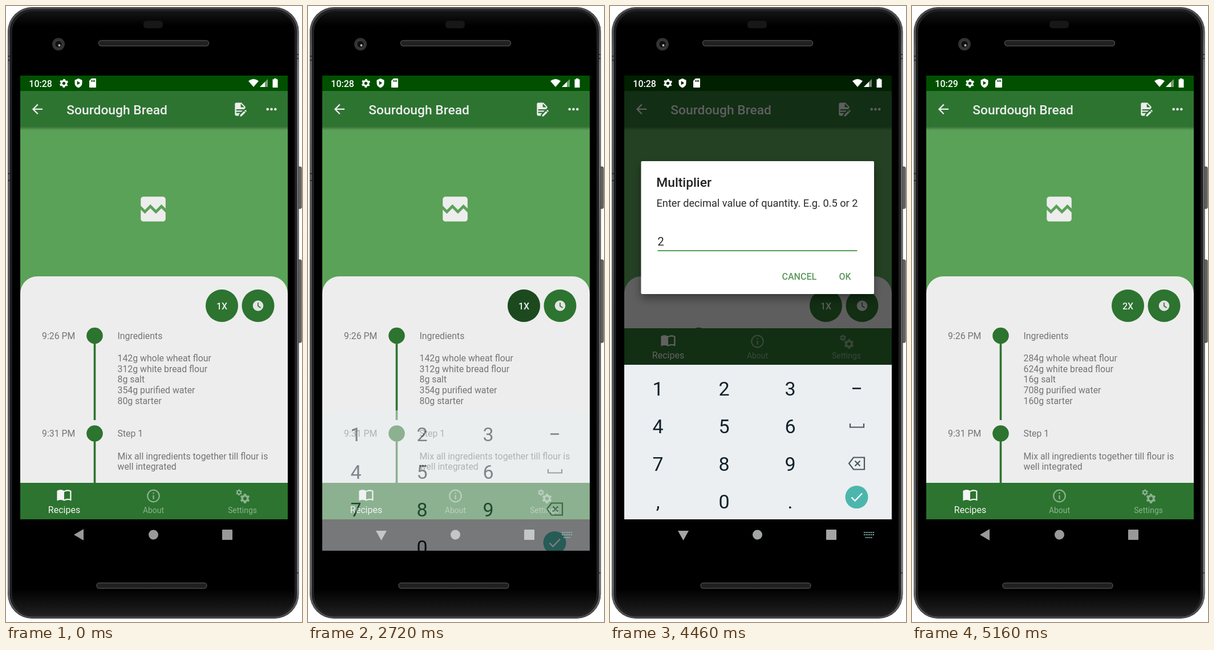
An HTML page that plays this animation: 519x1080 px, repeating every 8120 ms.

```html
<!DOCTYPE html>
<html lang="en">
<head>
<meta charset="utf-8">
<title>Recipe multiplier</title>
<style>
  html, body { margin: 0; width: 100%; height: 100%; overflow: hidden; background: #fff; }
  svg { display: block; width: 100%; height: 100%; }
  text { font-family: Roboto, sans-serif; font-size: 15.85px; white-space: pre; }
  .mid { text-anchor: middle; }
  .bold { font-weight: 500; font-size: 16px; }
  .title { font-weight: 500; font-size: 22.8px; }
  .body text { fill: #747474; }
  .key { font-size: 34px; fill: #10202a; }
</style>
</head>
<body>
<svg viewBox="0 0 519 1080">
  <defs>
    <clipPath id="screen"><rect x="25" y="122" width="469" height="833"/></clipPath>
    <clipPath id="button"><circle cx="378.5" cy="525.5" r="28.5"/></clipPath>
    <linearGradient id="rim" x2="0" y2="1">
      <stop stop-color="#4c4c4c"/><stop offset=".1" stop-color="#737373"/>
      <stop offset=".5" stop-color="#5c5c5c"/><stop offset=".95" stop-color="#747474"/><stop offset="1" stop-color="#4a4a4a"/>
    </linearGradient>
    <linearGradient id="glass" x2="0" y2="1">
      <stop stop-color="#151515"/><stop offset=".025" stop-color="#000"/>
      <stop offset=".955" stop-color="#000"/><stop offset="1" stop-color="#202020"/>
    </linearGradient>
    <linearGradient id="barShade" x2="0" y2="1">
      <stop stop-opacity=".3"/><stop offset="1" stop-opacity="0"/>
    </linearGradient>
    <radialGradient id="spot">
      <stop stop-color="#b4b4b4" stop-opacity=".08"/><stop offset=".8" stop-color="#b4b4b4" stop-opacity=".16"/>
      <stop offset="1" stop-color="#b4b4b4" stop-opacity=".2"/>
    </radialGradient>
    <filter id="shadow" x="-15%" y="-15%" width="130%" height="140%">
      <feDropShadow dx="0" dy="8" stdDeviation="8" flood-opacity=".38"/>
    </filter>
    <g id="gear" fill="none" stroke="currentColor" transform="rotate(30)">
      <circle r="4.6" stroke-width="3.4"/>
      <circle r="6.6" stroke-width="3" pathLength="12" stroke-dasharray="1" stroke-dashoffset=".5"/>
    </g>
  </defs>

  <!-- phone -->
  <g fill="#666" stroke="#3a3a3a">
    <rect x="510" y="282" width="8" height="73" rx="2"/>
    <rect x="510" y="445" width="8" height="145" rx="2"/>
  </g>
  <rect x="3" y="2" width="510.500" height="1072" rx="43" fill="#1b1b1b"/>
  <rect x="5" y="4" width="506.500" height="1068" rx="41" fill="none" stroke="url(#rim)" stroke-width="3"/>
  <rect x="9.500" y="8" width="497.500" height="1061" rx="38" fill="url(#glass)" stroke="#242424" stroke-width="2"/>
  <path d="M3 88h7M3 95h7M506 85h7M506 92h7M3 294h7M3 306h7M506 994h7" stroke="#222" stroke-width="1.5"/>
  <rect x="241" y="26" width="34" height="13" rx="5" fill="#171717"/>
  <g fill="#202020" stroke="#474747" stroke-width="1.5">
    <rect x="162.500" y="60.500" width="193" height="9.500" rx="4.700"/>
    <rect x="159" y="1011.500" width="193" height="9.500" rx="4.700"/>
  </g>
  <circle cx="92" cy="67" r="11" fill="#333"/>
  <circle cx="92" cy="67" r="6.500" fill="#111" stroke="#4b4b4b"/>
  <circle cx="93.500" cy="69" r="2" fill="#bbb"/>

  <g clip-path="url(#screen)">
    <rect x="25" y="122" width="469" height="833"/>
    <!-- recipe page -->
    <rect x="25" y="149" width="469" height="687" fill="#5aa257"/>
    <rect x="25" y="122" width="469" height="27" fill="#005000"/>
    <rect x="25" y="212" width="469" height="6" fill="url(#barShade)"/>
    <rect x="25" y="149" width="469" height="63" fill="#2d7431"/>
    <g fill="#ededed">
      <path transform="translate(41.300 167.300) scale(1.14)" d="M20 11H7.830l5.590-5.590L12 4l-8 8 8 8 1.410-1.410L7.830 13H20z"/>
      <text x="106.300" y="189.500" class="title">Sourdough Bread</text>
      <path transform="translate(396.800 167.300) scale(1.14)" d="M6 2C4.890 2 4 2.900 4 4V20A2 2 0 0 0 6 22H10V20.090L12.090 18H6V16H14.090L16.090 14H6V12H18.090L20 10.090V8L14 2H6M13 3.500L18.500 9H13V3.500M20.150 13L19.750 13.160 18.730 14.180 20.820 16.260 21.840 15.250Q22.150 14.850 21.840 14.460L20.540 13.160ZM18.140 14.770L12 20.920V23H14.080L20.230 16.850Z"/>
      <circle cx="458.700" cy="181" r="2.300"/><circle cx="465.500" cy="181" r="2.300"/><circle cx="472.300" cy="181" r="2.300"/>
      <path transform="translate(229 327) scale(2.420)" d="M21 5v6.590l-3-3.010-4 4.010-4-4-4 4-3-3.010V5c0-1.100.9-2 2-2h14c1.100 0 2 .9 2 2zm-3 6.420l3 3.010V19c0 1.100-.9 2-2 2H5c-1.100 0-2-.9-2-2v-6.580l3 2.990 4-4 4 4z"/>
      <path d="M25 836V504a30 30 0 0 1 30-30H464a30 30 0 0 1 30 30V836z"/>
    </g>
    <g fill="#2c742f">
      <circle cx="378.500" cy="525.500" r="28.500"/><circle cx="442" cy="525.500" r="28.500"/>
      <circle cx="155.500" cy="578" r="14.300"/><circle cx="155.500" cy="749.500" r="14.300"/>
      <path d="M153.700 578h3.600V726h-3.600zM153.700 749h3.600V836h-3.600z"/>
    </g>
    <circle id="ripple" cx="378.500" cy="525.500" clip-path="url(#button)"/>
    <text id="factor" x="378.500" y="531.500" class="mid bold" fill="#ededed"></text>
    <circle cx="442" cy="525.500" r="9.300" fill="#e4e4e4"/>
    <path d="M442 520v6l4.500 3" fill="none" stroke="#2c742f" stroke-width="1.700"/>
    <g class="body">
      <text x="63" y="583.500">9:26 PM</text><text x="195.500" y="583.500">Ingredients</text>
      <g id="ingredients"></g>
      <text x="63" y="755">9:31 PM</text><text x="195.500" y="755">Step 1</text>
      <text x="195.500" y="794.500">Mix all ingredients together till flour is</text>
      <text x="195.500" y="813">well integrated</text>
    </g>
    <g id="tabs" fill="#f4f4f4">
      <rect x="25" y="836" width="469" height="64" fill="#2c742f"/>
      <path transform="translate(88.300 843.200) scale(1.140)" d="M21 5c-1.110-.35-2.330-.5-3.500-.5-1.950 0-4.050.4-5.500 1.500-1.450-1.100-3.550-1.500-5.500-1.500S2.450 4.900 1 6v14.650c0 .25.25.5.5.5C3.100 20.450 5.050 20 6.500 20c1.950 0 4.050.4 5.500 1.500 1.350-.85 3.800-1.500 5.500-1.500 1.650 0 3.350.3 4.750 1.050.3.100.75-.1.750-.45V6c-.6-.45-1.250-.75-2-1zm0 13.500c-1.100-.35-2.300-.5-3.500-.5-1.700 0-4.150.65-5.500 1.500V8c1.350-.85 3.800-1.500 5.500-1.500 1.200 0 2.400.15 3.500.5z"/>
      <text x="102" y="889" class="mid" style="font-size:16px">Recipes</text>
      <g fill="#8db28f" color="#8db28f">
        <circle cx="258.500" cy="859" r="10.300" fill="none" stroke="#8db28f" stroke-width="2.200"/>
        <path d="M257.400 853h2.300v2.300h-2.300zM257.400 857.700h2.300v7h-2.300z"/>
        <use href="#gear" transform="translate(419 863.500) scale(1.050)"/>
        <use href="#gear" transform="translate(408.500 852.800) scale(.67)"/>
        <text x="258.500" y="889" class="mid" style="font-size:13.900px">About</text>
        <text x="414.500" y="889" class="mid" style="font-size:13.900px">Settings</text>
      </g>
    </g>
    <rect id="dim" x="25" y="122" width="469" height="778"/>

    <!-- status bar -->
    <g fill="#fff" color="#fff">
      <text id="clock" x="40.300" y="141.500" class="bold"></text>
      <use href="#gear" transform="translate(101.500 135.500) scale(.94)"/>
      <path fill-rule="evenodd" d="M127 127l6.500 3v5q0 6-6.500 8.500Q120.500 141 120.500 135v-5zM124.700 131.500v7l5.500-3.500z"/>
      <path fill-rule="evenodd" d="M150 127h7q1 0 1 1v14q0 1-1 1h-10q-1 0-1-1V131zM149.500 130v3h1.500v-3zm2.500 0v3h1.500v-3zm2.500 0v3h1.500v-3z"/>
      <path d="M425 131.500q9-7 18 0l-9 10.500z"/>
      <path d="M459 128v14h-14z" opacity=".45"/><path d="M454 133v9h-9z"/>
      <path d="M470 127h4v1.500h2.500V143h-9V128.500h2.500z"/>
    </g>

    <!-- dialog -->
    <g id="dialog">
      <rect x="54.500" y="272" width="408.500" height="233" rx="2" fill="#fff" filter="url(#shadow)"/>
      <text x="81.300" y="317" class="title" fill="#212121">Multiplier</text>
      <text x="81.500" y="351.500" style="font-size:18.200px" fill="#2b2b2b">Enter decimal value of quantity. E.g. 0.5 or 2</text>
      <text id="entry" x="83.300" y="419.500" style="font-size:20.500px"></text>
      <rect id="cursor" x="94.700" y="398.500" width="2" height="26.500" fill="#4f9a50"/>
      <rect x="83.500" y="428" width="350" height="2" fill="#569f55"/>
      <text x="301.500" y="479.500" class="bold" fill="#5b985c">CANCEL</text>
      <text x="401.500" y="479.500" class="bold" fill="#5b985c">OK</text>
    </g>

    <!-- keypad -->
    <g id="keypad">
      <rect x="25" y="629" width="469" height="271" fill="#ebeff1"/>
      <rect id="keyGlow" x="142" y="637" width="116" height="65" rx="6" fill="#c3ccd0"/>
      <g id="keys"></g>
      <g fill="none" stroke="#4b565c" stroke-width="2.200">
        <path d="M425 670.500h15" stroke="#10202a" stroke-width="2.600"/>
        <path d="M421 732v6.500h24V732"/>
        <path d="M427 791.500h19v21H427l-8-10.500zM429.500 797.500l9 9m0-9l-9 9"/>
      </g>
      <circle cx="432.500" cy="861" r="20" fill="#4db6ac"/>
      <path d="M423.500 861.500l6 6 12.500-13" fill="none" stroke="#fff" stroke-width="2.300"/>
      <rect id="keyShade" x="25" y="629" width="469" height="271" opacity=".6"/>
    </g>

    <!-- navigation -->
    <g id="nav" fill="#999">
      <path id="back"/>
      <circle cx="258.500" cy="927" r="8.500"/>
      <rect x="379" y="918" width="18" height="18" rx="1"/>
      <path id="switcher" d="M445 923h18M445 927h18M448 932h12" stroke="#86b3ae" stroke-width="2" stroke-dasharray="2 1.200"/>
    </g>
  </g>
  <circle id="touch" fill="url(#spot)"/>
</svg>

<script>
const LOOP = 8120;
const TICKS = [0, 1240, 1310, 1390, 1470, 1560, 1850, 2720, 2750, 2830, 2900, 3070, 3150, 3220,
  3850, 3920, 4000, 4080, 4150, 4460, 4920, 5000, 5080, 5160];
const INGREDIENTS = [[142, "whole wheat flour"], [312, "white bread flour"], [8, "salt"],
  [354, "purified water"], [80, "starter"]];

const $ = id => document.getElementById(id);
const set = (id, attrs) => { for (const k in attrs) $(id).setAttribute(k, attrs[k]); };
const ramp = (t, from, to) => Math.min(1, Math.max(0, (t - from) / (to - from)));
const within = (t, from, to) => t >= from && t < to;
const easeOut = p => 1 - (1 - p) ** 2;

$("keys").innerHTML = [..."123456789,0."].map((c, i) =>
  `<text class="key mid" x="${84 + 116 * (i % 3)}" y="${682.5 + 66 * Math.floor(i / 3)}">${c}</text>`).join("");
$("ingredients").innerHTML = INGREDIENTS.map((_, i) =>
  `<text x="195.5" y="${623 + 18.65 * i}"></text>`).join("");

function draw(t) {
  const open = t < 5080 ? ramp(t, 2720, 2900) : t < 5160 ? 0.35 : 0;
  const keypad = within(t, 2720, 5080);
  const factor = t < 5160 ? 1 : 2;

  $("clock").textContent = t < 5160 ? "10:28" : "10:29";
  $("factor").textContent = factor + "X";
  INGREDIENTS.forEach(([grams, name], i) => {
    $("ingredients").children[i].textContent = `${grams * factor}g ${name}`;
  });
  const press = within(t, 1240, 2900) ? ramp(t, 1160, 1560) : 0;
  set("ripple", { r: 12 + 17 * press, opacity: press && 0.1 + 0.26 * press });

  set("tabs", { transform: `translate(0 ${within(t, 3070, 5080) ? -271 : 0})` });
  set("dim", { opacity: 0.6 * open });
  set("dialog", { opacity: open, transform: `translate(0 ${135 * (1 - easeOut(ramp(t, 2990, 3220)))})` });
  const typed = t >= 3920;
  $("entry").textContent = typed ? "2" : "1";
  set("entry", { fill: typed ? "#2b2b2b" : "#a3a3a3" });
  set("cursor", { opacity: +(within(t, 3920, 4460) || t >= 4960) });

  const rise = ramp(t, 2720, 2900);
  set("keypad", { opacity: keypad ? 0.5 + 0.5 * rise : 0, transform: `translate(0 ${80 * (1 - easeOut(rise))})` });
  set("keyGlow", { opacity: t < 3850 ? 0 : 0.8 * (1 - ramp(t, 3920, 4150)) });
  set("keyShade", { opacity: t >= 5000 ? 0.6 : 0 });
  set("back", { d: keypad ? "M119 920h19l-9.500 17z" : "M119 927l17-10v20z" });
  set("switcher", { opacity: +keypad });
  set("nav", { fill: keypad && t < 2830 ? "#c4c6c7" : keypad ? "#a3a5a5" : "#999" });

  const spot = within(t, 1240, 1850) ? [375, 525, 32]
    : within(t, 3850, 4000) ? [200, 671, 29]
    : within(t, 4920, 5080) ? [416, 489, 29] : [0, 0, 0];
  set("touch", { cx: spot[0], cy: spot[1], r: spot[2] });
}

function frame(now) {
  const t = now % LOOP;
  draw(TICKS.findLast(tick => tick <= t));
  requestAnimationFrame(frame);
}
draw(0);
requestAnimationFrame(frame);
</script>
</body>
</html>
```
